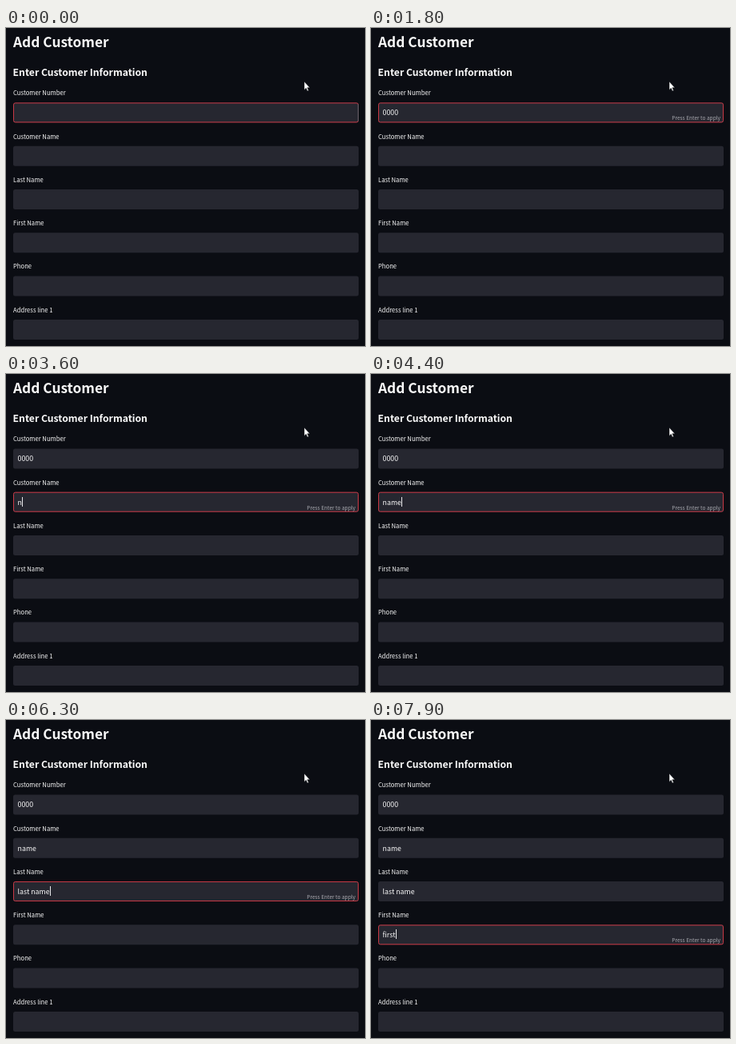
An HTML page that plays this animation: 449x398 px, repeating every 8000 ms.

```html
<!DOCTYPE html>
<html lang="en">
<head>
<meta charset="utf-8">
<title>Add Customer</title>
<style>
  html, body { margin: 0; width: 100%; height: 100%; overflow: hidden; background: #0b0d13; }
  svg { display: block; width: 449px; height: 398px; }
  text {
    font-family: "Noto Sans CJK JP", "Noto Sans CJK SC", "Noto Sans CJK KR", "Noto Sans CJK TC", "Open Sans", sans-serif;
    fill: #fafafa;
    white-space: pre;
  }
  .title { font-size: 17.3px; font-weight: 700; }
  .subtitle { font-size: 12.2px; font-weight: 700; }
  .label { font-size: 7.68px; }
  .value { font-size: 8.8px; }
  .hint { font-size: 6.57px; fill: #a9aab0; text-anchor: end; }
</style>
</head>
<body>
<svg id="stage" viewBox="0 0 449 398">
  <rect width="449" height="398" fill="#0b0d13"/>
  <text class="title" x="9" y="24.4">Add Customer</text>
  <text class="subtitle" x="8.6" y="60.4">Enter Customer Information</text>
  <g id="form"></g>
  <rect id="caret" width="1" height="12" fill="#e8e8ea"/>
  <path d="M373 67V77.4L375.3 75.3L376.9 78.9L378.5 78.2L376.9 74.7H380Z"
        fill="#fff" stroke="#0b0d13" stroke-width=".5"/>
</svg>
<script>
const LOOP = 8000, BLINK = 500, PITCH = 54.3, TEXT_X = 14.6;
const labels = ["Customer Number", "Customer Name", "Last Name", "First Name", "Phone", "Address line 1"];

// focus: caret arrives; ring: red border arrives; first/step: key press timing
const entries = [
  { text: "0000",      focus: -700, ring: -700, first: 800,  step: 150 },
  { text: "name",      focus: 2850, ring: 2950, first: 3600, step: 200 },
  { text: "last name", focus: 4850, ring: 4950, first: 5400, step: 100 },
  { text: "first",     focus: 6950, ring: 7050, first: 7300, step: 110 }
];

const form = document.getElementById("form");
const caret = document.getElementById("caret");

function add(tag, attrs, content = "") {
  const node = document.createElementNS("http://www.w3.org/2000/svg", tag);
  for (const key in attrs) node.setAttribute(key, attrs[key]);
  node.textContent = content;
  return form.appendChild(node);
}

const show = (node, on) => node.setAttribute("visibility", on ? "visible" : "hidden");

const fields = labels.map((label, i) => {
  const y = i * PITCH;
  add("text", { class: "label", x: 9, y: y + 84.2 }, label);
  add("rect", { x: 9, y: y + 93.4, width: 432, height: 25, rx: 2.5, fill: "#262730" });
  return {
    top: y + 93.4,
    ring: add("rect", { x: 9.5, y: y + 93.9, width: 431, height: 24, rx: 2.2, fill: "none", stroke: "#c83845" }),
    edge: add("rect", { x: 440, y: y + 95.4, width: 1, height: 21, fill: "#6c626b" }),
    value: add("text", { class: "value", x: TEXT_X, y: y + 109.2 }),
    hint: add("text", { class: "hint", x: 437, y: y + 115.2 }, "Press Enter to apply")
  };
});

function render(t) {
  const active = entries.filter(e => t >= e.focus).length - 1;
  const ringed = entries.filter(e => t >= e.ring).length - 1;

  fields.forEach((field, i) => {
    const entry = entries[i];
    const count = entry ? Math.floor((t - entry.first) / entry.step) + 1 : 0;
    const typed = entry ? entry.text.slice(0, Math.max(0, count)) : "";
    const hinted = i === active && typed !== "";
    if (field.value.textContent !== typed) field.value.textContent = typed;
    show(field.ring, i === ringed);
    show(field.edge, i === 0 && ringed === 0 && !hinted);
    show(field.hint, hinted);
  });

  // The blink restarts at every key press.
  const { text, focus, first, step } = entries[active];
  const { value, top } = fields[active];
  const length = value.textContent.length;
  const lastKey = length ? first + (length - 1) * step : focus;
  show(caret, Math.floor((t - lastKey) / BLINK) % 2 === 0);
  caret.setAttribute("x", Math.round(TEXT_X + (length ? value.getComputedTextLength() : 0)));
  caret.setAttribute("y", Math.round(top + 6.2));
}

function tick(now) {
  render(now % LOOP);
  requestAnimationFrame(tick);
}
render(0);
requestAnimationFrame(tick);
</script>
</body>
</html>
```
